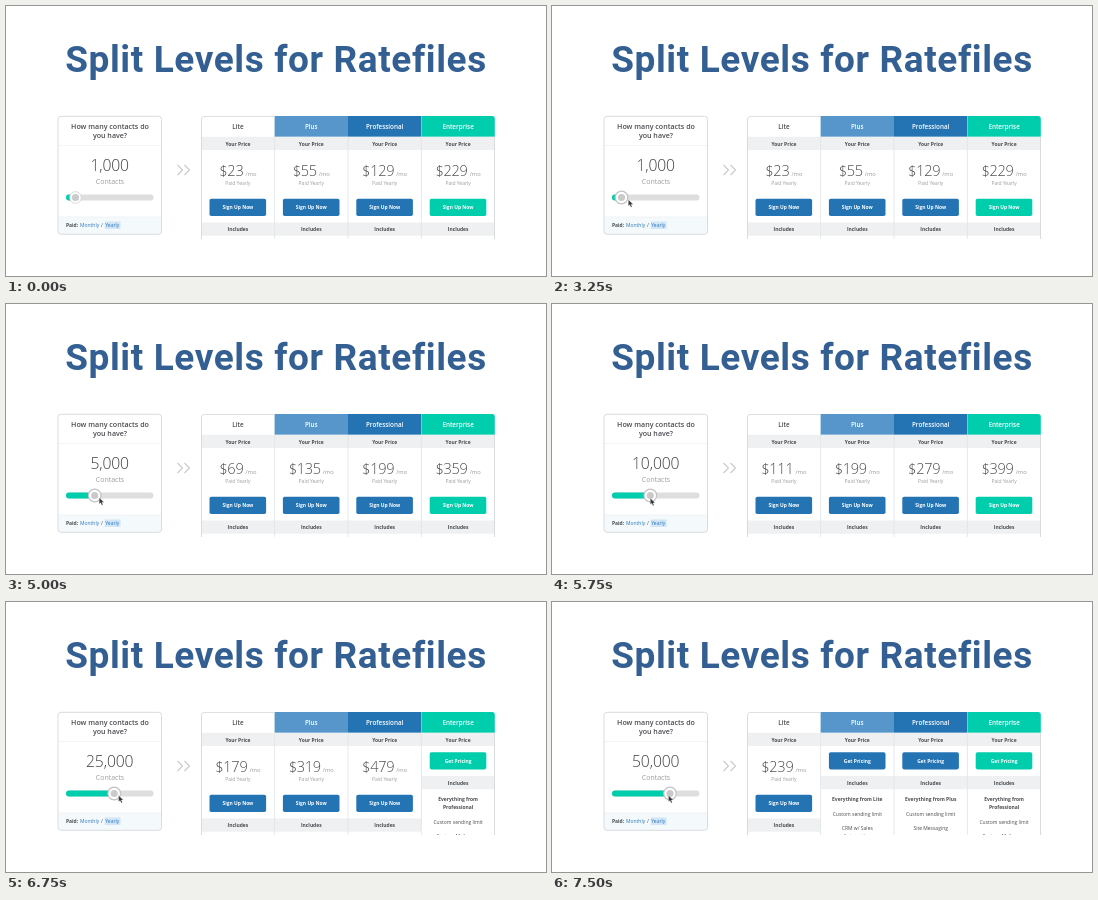
These frames come from a looping animation (540 px wide and 270 px high, 8 s). An HTML page:

```html
<!DOCTYPE html>
<html lang="en">
<head>
<meta charset="utf-8">
<title>Pricing slider</title>
<style>
  html, body { margin: 0; width: 100%; height: 100%; overflow: hidden; background: #fff; }
  svg { display: block; width: 540px; height: 270px; font-family: "Open Sans", "Noto Sans", sans-serif; }
  text { fill: #484b4f; text-anchor: middle; }
  .title { font: 600 37px Roboto, Inter, sans-serif; letter-spacing: .6px; fill: #345f93; }
  .ask { font-size: 7.1px; font-weight: 600; }
  .head { font-size: 6.3px; font-weight: 600; }
  .strong { font-size: 4.95px; font-weight: 700; }
  .item { font-size: 5px; }
  .soft { fill: #999da1; }
  .link { fill: #2b78b9; }
  .price { font-size: 14.6px; font-weight: 300; letter-spacing: -.3px; fill: #484848; }
  .unit { font-size: 5.8px; font-weight: 400; letter-spacing: 0; fill: #999; }
  .count { font-size: 15.7px; font-weight: 300; letter-spacing: -.15px; fill: #444; }
  .white { fill: #fff; }
  .left { text-anchor: start; }
</style>
</head>
<body>
<svg id="stage" viewBox="0 0 540 270">
  <defs>
    <clipPath id="tableClip"><path d="M195 233V113q0-3 3-3H486q3 0 3 3V233Z"/></clipPath>
  </defs>
  <text class="title" x="270" y="65.700">Split Levels for Ratefiles</text>

  <g id="card">
    <path d="M52 211H155.500V225.300q0 3-3 3H55q-3 0-3-3Z" fill="#f4f9fc"/>
    <path d="M52 139.500H155.500M52 211H155.500" stroke="#eceff1" stroke-width=".7"/>
    <rect x="52" y="110.300" width="103.500" height="118" rx="3" fill="none" stroke="#d9dcdf"/>
    <text x="104" y="122.500" class="ask">How many contacts do</text>
    <text x="104" y="132" class="ask">you have?</text>
    <text id="count" class="count" x="103.700" y="164.500"></text>
    <text class="soft" x="104" y="177.500" font-size="7">Contacts</text>
    <rect x="60" y="188.500" width="87.500" height="6" rx="3" fill="#dedede"/>
    <rect id="fill" x="60" y="188.500" height="6" rx="3" fill="#00cdac"/>
    <g id="knob">
      <circle id="ring" fill="#fff"/>
      <circle r="3.600" fill="#cacaca"/>
    </g>
    <rect x="98.800" y="215.500" width="15.800" height="7.500" fill="#d2e6f7"/>
    <text class="strong left" x="60" y="221">Paid:</text>
    <text class="item left link" x="74" y="221">Monthly</text>
    <text class="item" x="96" y="221">/</text>
    <text class="item left link" x="99.300" y="221">Yearly</text>
  </g>

  <path d="M171.500 159l5 5-5 5M178.500 159l5 5-5 5" fill="none" stroke="#c9c9c9" stroke-width="1.100"/>
  <g id="table" clip-path="url(#tableClip)"></g>
  <path id="cursor" d="M0 0L0 6.300L1.500 5L2.600 7.500L3.800 7L2.700 4.600L4.800 4.500Z"
        fill="#33363a" stroke="#fff" stroke-width=".3"/>
</svg>
<script>
const LOOP = 8000;
const COL = 73.4, LEFT = 195.2;
const $ = id => document.getElementById(id);

const plans = [
  { name: "Lite", head: "#fff", button: "#2474b4" },
  { name: "Plus", head: "#5696cb", button: "#2474b4",
    list: [["Everything from Lite", 199, 1], ["Custom sending limit", 213.5], ["CRM w/ Sales", 228], ["Automation", 236]] },
  { name: "Professional", head: "#2474b4", button: "#2474b4",
    list: [["Everything from Plus", 199, 1], ["Custom sending limit", 213.5], ["Site Messaging", 228]] },
  { name: "Enterprise", head: "#00cdac", button: "#00cdac",
    list: [["Everything from", 199, 1], ["Professional", 207, 1], ["Custom sending limit", 221.5], ["Custom Mailserver", 235.5]] }
];

// start time, contacts, knob x, price per plan (0 = price on request)
const stages = [
  [0, "1,000", 69.5, [23, 55, 129, 229]],
  [3500, "2,500", 79, [39, 99, 129, 229]],
  [4250, "5,000", 88.7, [69, 135, 199, 359]],
  [5250, "10,000", 98.3, [111, 199, 279, 399]],
  [6000, "25,000", 108.2, [179, 319, 479, 0]],
  [7000, "50,000", 118, [239, 0, 0, 0]]
];

// time, x, y of the pointer tip
const moves = [
  [500, 56.5, 220], [750, 62, 199], [1000, 67, 193.3], [1250, 67.3, 193.3],
  [2500, 69.3, 193.3], [2750, 71.4, 193.5], [3000, 74, 194], [3250, 76.3, 193.8],
  [3500, 77.5, 193.5], [3750, 80.2, 193.5], [4000, 83, 193.5], [4250, 86, 193.4],
  [4500, 88.3, 193.5], [4750, 88.4, 194], [5000, 93.2, 193.8], [5250, 95.5, 194],
  [5750, 98.3, 194.3], [6000, 105.3, 194], [6250, 107.8, 193.7], [6500, 110.2, 193.5],
  [6750, 112.6, 193.5], [7000, 116.2, 193.3], [7500, 116.5, 193.5]
];

const text = (x, y, cls, s) => `<text x="${x}" y="${y}" class="${cls}">${s}</text>`;
const rect = (x, y, w, h, fill, rx = 0) =>
  `<rect x="${x}" y="${y}" width="${w}" height="${h}" fill="${fill}" rx="${rx}"/>`;

function strip(x, y, label) {
  return rect(x, y, COL, 13.2, "#eff0f1") + text(x + COL / 2, y + 8.7, "strong", label);
}

function button(x, y, fill, label) {
  return rect(x + 8.3, y, 56.6, 17.2, fill, 1.8) + text(x + COL / 2, y + 10.5, "strong white", label);
}

function column(plan, price, i) {
  const x = LEFT + i * COL, mid = x + COL / 2;
  let out = rect(x, 110, COL, 123, "#fff") + rect(x, 110, COL, 20.8, plan.head)
    + text(mid, 122.5, i ? "head white" : "head", plan.name)
    + strip(x, 130.8, "Your Price");
  if (price) {
    out += text(mid, 170, "price", `$${price}<tspan class="unit" dx="2">/mo</tspan>`)
      + text(mid, 179.4, "item soft", "Paid Yearly")
      + button(x, 192.8, plan.button, "Sign Up Now")
      + strip(x, 216.5, "Includes");
  } else {
    out += button(x, 150.2, plan.button, "Get Pricing") + strip(x, 174, "Includes")
      + plan.list.map(([s, y, bold]) => text(mid, y, bold ? "strong" : "item", s)).join("");
  }
  return out;
}

function frameLines() {
  let d = "";
  for (let i = 1; i < 4; i++) d += `M${LEFT + i * COL} 130.8V233`;
  return `<path d="${d}" stroke="#dfe2e4" stroke-width=".8"/>
    <path d="M195.500 233V113q0-2.600 2.600-2.600H268.600M488.500 130.800V233" fill="none" stroke="#d4d8db" stroke-width=".9"/>`;
}

const at = (steps, t) => steps.filter(s => s[0] <= t).pop();
let shown;

function draw(t) {
  const stage = at(stages, t), move = at(moves, t);
  if (stage !== shown) {
    const [, contacts, x, prices] = shown = stage;
    $("count").textContent = contacts;
    $("fill").setAttribute("width", x - 60);
    $("knob").setAttribute("transform", `translate(${x} 191.5)`);
    $("table").innerHTML = plans.map((p, i) => column(p, prices[i], i)).join("") + frameLines();
  }
  const hover = t >= 1250;
  $("ring").setAttribute("r", hover ? 6.3 : 5.8);
  $("ring").setAttribute("stroke", hover ? "#c2c2c2" : "#d3d3d3");
  $("ring").setAttribute("stroke-width", hover ? 1.2 : 0.9);
  $("cursor").style.display = move ? "" : "none";
  if (move) $("cursor").setAttribute("transform", `translate(${move[1]} ${move[2]})`);
}

const start = performance.now();
function tick() {
  draw((performance.now() - start) % LOOP);
  requestAnimationFrame(tick);
}
tick();
</script>
</body>
</html>
```
